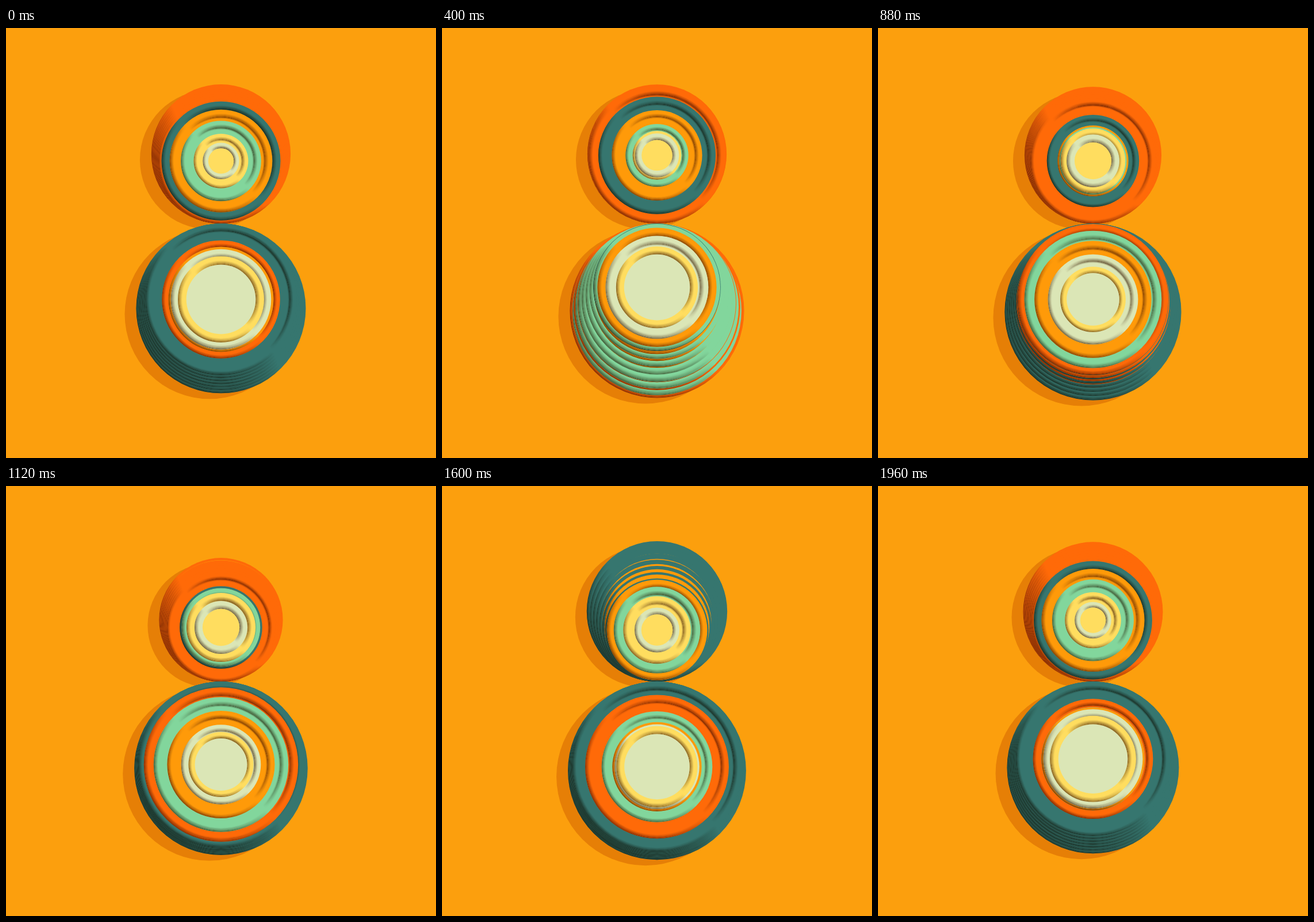
An HTML page with a canvas for the animation above (2 s loop, 748 by 748 pixels).

```html
<!DOCTYPE html>
<html lang="en">
<head>
<meta charset="utf-8">
<title>Eight</title>
<style>
  html, body { margin: 0; width: 100%; height: 100%; overflow: hidden; background: #fc9f0d; }
  canvas { display: block; width: 748px; height: 748px; }
</style>
</head>
<body>
<canvas id="stage" width="748" height="748"></canvas>
<script>
const ctx = document.getElementById('stage').getContext('2d');
const LOOP = 2000, STEP = 40, TAU = Math.PI * 2;
const SLICES = 7, LEAD = 240;
const CX = 374, JOINT = 340.3;

const BG = '#fc9f0d', SHADOW = '#e67f06';
const RED = [255, 106, 8], TEAL = [54, 118, 111], ORANGE = [255, 154, 9];
const MINT = [130, 214, 156], YELLOW = [255, 221, 95], CREAM = [219, 230, 182];
const SHADE = [0.5, 0.41, 0.34];

// base: mean radius of the outer ring, gap: shrink per ring, peak: time of its largest size
const stacks = [
  { colors: [RED, TEAL, ORANGE, MINT, YELLOW, CREAM], core: YELLOW, dir: -1,
    base: 103, gap: 12.6, swing: 0.181, peak: 442, rim: 12, top: 123.5, mid: 107.5 },
  { colors: [TEAL, RED, MINT, ORANGE, CREAM, YELLOW], core: CREAM, dir: 1,
    base: 132.7, gap: 13.2, swing: 0.145, peak: 1440, rim: 13, top: 156, mid: 134.5 }
];

function wave(ms) {
  const u = ms / LOOP * TAU;
  return Math.cos(u) - 0.15 * Math.cos(2 * u);
}

const mean = (s, i) => s.base - s.gap * i;
const rgb = (c, a = 1) => `rgba(${c.map(Math.round).join()},${a})`;

function radii(s, t) {
  return s.colors.map((_, i) =>
    mean(s, i) * (1 + s.swing * wave(t - s.peak + i * LOOP / 7)));
}

// Slices from back to front; q is 1 at the back and 0 at the front.
function slices(s, t) {
  const front = Math.max(...radii(s, t));
  const ahead = Math.max(...radii(s, t + LEAD));
  const back = s.top - 0.0255 * (ahead - s.mid) ** 2;
  const list = [];
  for (let k = SLICES - 1; k >= 0; k--) {
    const q = k / (SLICES - 1);
    const rs = radii(s, t + LEAD * q);
    const size = front + (back - front) * q;
    const scale = size / Math.max(...rs);
    list.push({ size, cy: JOINT + s.dir * size, rs: rs.map(r => r * scale), front: k === 0 });
  }
  return list;
}

function disc(x, y, r, fill) {
  ctx.fillStyle = fill;
  ctx.beginPath();
  ctx.arc(x, y, r, 0, TAU);
  ctx.fill();
}

// Dark tone growing towards the lower left (side 1) or the upper right (side -1).
function shade(y, r, color, side) {
  const dark = color.map((v, i) => v * SHADE[i]);
  const d = r * Math.SQRT1_2 * side;
  const g = ctx.createLinearGradient(CX, y, CX - d, y + d);
  g.addColorStop(0, rgb(dark, 0));
  g.addColorStop(0.25, rgb(dark, 0.4));
  g.addColorStop(0.6, rgb(dark, 0.8));
  g.addColorStop(1, rgb(dark, 1));
  return g;
}

function ring(y, r, alpha) {
  if (r <= 0.5 || alpha <= 0) return;
  ctx.globalAlpha = alpha;
  ctx.beginPath();
  ctx.arc(CX, y, r, 0, TAU);
  ctx.stroke();
}

function bevel(y, r, rim, color, inner) {
  const slope = rim * 0.5;
  const fade = i => (1 - i / slope) ** 1.2;
  ctx.lineWidth = 1.1;
  ctx.strokeStyle = shade(y, r, color, 1);
  for (let i = 0; i < slope; i++) ring(y, r - i - 0.5, fade(i));
  if (inner) {
    ctx.strokeStyle = shade(y, r - rim, color, -1);
    for (let i = 0; i < slope; i++) ring(y, r - rim + i + 0.5, fade(i));
    for (let i = 0; i < 2; i++) ring(y, r - rim - i - 0.5, 0.5 - i * 0.3);
  }
  ctx.globalAlpha = 1;
}

function drawSlice(s, { size, cy, rs, front }) {
  rs.forEach((r, i) => {
    if (!front && r < size * 0.75) return;
    const rim = s.rim * r / mean(s, i);
    disc(CX, cy, r, rgb(s.colors[i]));
    bevel(cy, r, rim, s.colors[i], front);
    if (front && i === rs.length - 1) disc(CX, cy, r - rim, rgb(s.core));
  });
}

function draw(t) {
  ctx.fillStyle = BG;
  ctx.fillRect(0, 0, 748, 748);
  const piles = stacks.map(s => slices(s, t));
  for (const pile of piles) {
    const widest = pile.reduce((a, b) => b.size > a.size ? b : a);
    disc(CX - 20, widest.cy + 10, widest.size, SHADOW);
  }
  piles.forEach((pile, n) => pile.forEach(slice => drawSlice(stacks[n], slice)));
}

const start = performance.now();
function tick() {
  const t = (performance.now() - start) % LOOP;
  draw(Math.floor(t / STEP) * STEP);
  requestAnimationFrame(tick);
}
tick();
</script>
</body>
</html>
```
